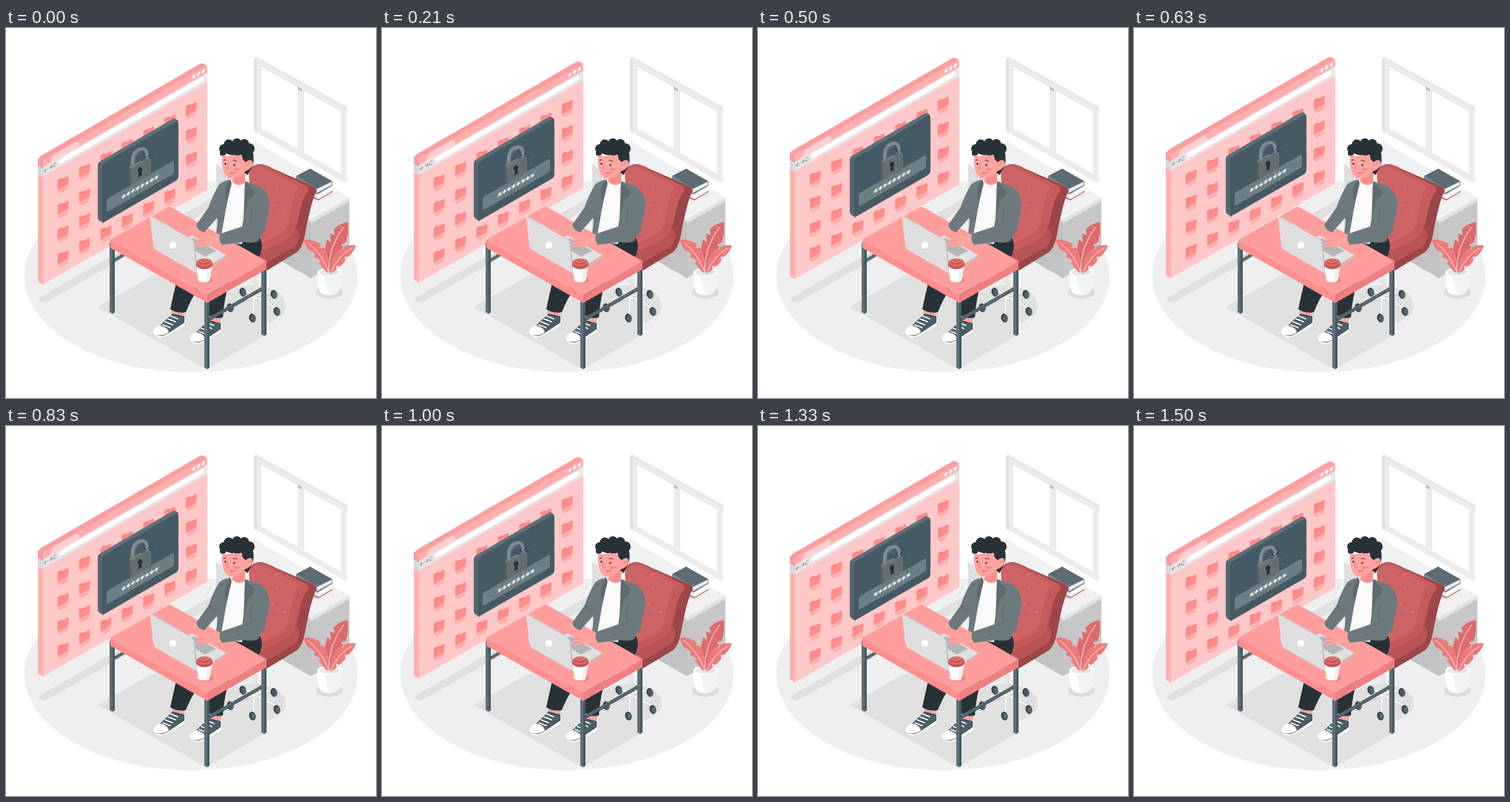
Animation, 500 px wide and 500 px high, one loop 1.54 s. Source, as an HTML page with a canvas:

```html
<!DOCTYPE html>
<html lang="en">
<head>
<meta charset="utf-8">
<title>Locked files</title>
<style>
html, body { margin: 0; width: 100%; height: 100%; overflow: hidden; background: #fff; }
canvas { display: block; width: 100%; height: 100%; }
</style>
</head>
<body>
<canvas id="stage" width="500" height="500"></canvas>
<script>
const ctx = document.getElementById('stage').getContext('2d');
const LOOP = 1540, LIFT = 9, FPS = 24, ISO = 0.577;
const DARK = '#263238', SLATE = '#455a64', SKIN = '#ffa3a0', JACKET = '#6c7a80';

function fill(color, d) {
  ctx.fillStyle = color;
  ctx.fill(new Path2D(d));
}

function line(color, width, d, cap = 'round') {
  ctx.strokeStyle = color;
  ctx.lineWidth = width;
  ctx.lineCap = cap;
  ctx.lineJoin = 'round';
  ctx.stroke(new Path2D(d));
}

function oval(color, x, y, rx, ry = rx, turn = 0) {
  ctx.fillStyle = color;
  ctx.beginPath();
  ctx.ellipse(x, y, rx, ry, turn, 0, 7);
  ctx.fill();
}

function box(color, x, y, w, h, r = 0) {
  ctx.fillStyle = color;
  ctx.beginPath();
  ctx.roundRect(x, y, w, h, r);
  ctx.fill();
}

// Draws in the plane of the floating screen, with its origin at (x, y).
function onScreen(x, y, draw) {
  ctx.save();
  ctx.transform(1, -ISO, 0, 1, x, y);
  draw();
  ctx.restore();
}

function drawRoom() {
  oval('#efefef', 250, 335.3, 225.3, 130);
  fill('#e0e0e0', 'M46 364L276 231Q283 228 289 232L292 236L55 370Q49 372 46 369Q44 366 46 364Z');
  fill('#e0e0e0', 'M124 377L222 321L353 396V414L274 459L263 457Z');
  oval('#e0e0e0', 334, 375, 44, 27);

  fill('#ececec', 'M335 40L338 38L461 106V208L458 209L335 139Z');
  fill('#e2e2e2', 'M335 40L339 42V141L335 139Z');
  fill('#fff', 'M344 51L394 79V163L344 135ZM402 84L453 112V197L402 168Z');
  line('#e0e0e0', 1, 'M344 135V51L394 79M402 168V84L453 112M339 42L460 109');
  fill('#c4c4c4', 'M394 79L400 82V86L394 83Z');

  fill('#dedede', 'M284 184L412 259V338L284 264Z');
  fill('#c7c7c7', 'M412 259L464 229V308L412 338Z');
  fill('#c2c2c2', 'M372 240L412 262V338L372 315Z');
  fill('#f1f1f1', 'M284 183L336 153L464 229L412 259Z');
  fill('#e3e3e3', 'M412 259L464 229V234L412 264Z');
}

function drawBooks() {
  fill('#e8e8e8', 'M408 222L421 213L441 221V225L421 236L414 232Z');
  fill('#fafafa', 'M416 228L441 215V223L422 234Z');
  fill('#c95e60', 'M414 227L422 231L441 220V222L422 233L414 229Z');
  fill('#78868c', 'M392 200L420 217L441 207V213L421 225L414 221V218L392 205Z');
  fill('#f5f5f5', 'M420 218L440 208V212L420 223Z');
  fill('#5c6c74', 'M392 200L411 190L441 207L420 217Z');
  line('#cfd8dc', 0.7, 'M421 221L438 212M423 231L439 222');
}

function drawPlant() {
  oval('#dcdcdc', 437, 357, 18, 9);
  fill('#f3f3f3', 'M421 330C420 350 423 358 430 360Q438 363 446 359C453 355 455 346 454 330Z');
  fill('#fff', 'M421 330C420 350 423 358 430 360Q437 362 442 360C433 357 430 346 431 332Z');
  oval('#fff', 437.5, 330, 16.5, 6);
  oval('#e6e6e6', 437.5, 330.5, 13.5, 4.3);
  fill('#dc6b6d', 'M436 330C430 314 430 296 434 286L439 289L438 278L444 280L443 272Q451 264 462 262C463 274 462 282 459 290L452 293L456 296Q450 304 447 309L442 310Q440 320 438 330Z');
  fill('#ee7b7b', 'M435 331C429 327 427 321 423 318L425 314L416 309L418 305L408 299Q404 293 402 286C411 285 419 288 425 292L424 297L430 297Q437 308 437 329Z');
  fill('#ee7b7b', 'M438 332C439 317 443 304 452 298L455 300L458 295Q466 292 473 294C471 300 467 305 463 309L457 309L459 314Q455 320 450 323L446 321L447 326Q443 330 438 332Z');
  line('#ffe0e0', 1, 'M436 330Q436 295 456 269M436 330Q428 306 408 290M439 330Q448 308 468 297');
}

function drawFolder(x, y) {
  onScreen(x, y, () => {
    fill('#ff8484', 'M-7 -8H-2L0 -6H7V5H-7Z');
    fill('#ff8d8d', 'M-6 -4H8L7 6H-7Z');
    line('#f98787', 0.9, 'M-6 8H7M-4 10.5H6');
  });
}

function drawBrowser() {
  fill('#ffb1b1', 'M43 176L50 179V347L43 343Z');
  fill('#f39a9a', 'M43 177L50 179V190L43 186Z');
  fill('#d9d9d9', 'M43 186L50 190V202L43 198Z');
  fill('#ff9c9c', 'M43 182Q43 175 49 172L260 50Q264 47 267 48.3L272 51.5L50 180V190L43 186Z');
  onScreen(50, 347, () => {
    box('#ffc8c8', 0, -147, 222, 147);
    box('#e7e7e7', 0, -160, 222, 14);
    box('#ffafaf', 0, -168.5, 222, 10, [5, 4, 0, 0]);
    fill('#ffd0d0', 'M6 -158Q10 -158 11 -162Q12 -167 16 -167H43Q47 -167 48 -163Q49 -158 53 -158Z');
    box('#fff', 22, -156.5, 195, 7, 3.5);
    line('#929292', 0.9, 'M1.5 -152.5H6M3.5 -155L1.5 -152.5L3.5 -150.5M8 -152.5H12.5M10.5 -155L12.5 -152.5L10.5 -150.5M18 -154A2.3 2.3 0 1 0 18 -151');
    for (let i = 0; i < 3; i++) oval('#fff', 204 + i * 6.3, -163.5, 2.1, 2.5);
  });
  for (let col = 0; col < 7; col++) {
    for (let row = 0; row < 4; row++) {
      drawFolder(77 + col * 28.85, 210 - col * 16.65 + row * 33.4);
    }
  }
}

function drawLockDialog() {
  fill('#54676f', 'M124 186Q124 182 128 180L224 124Q227 122 229 123L233 126L132 186V264L127 261Q124 259 124 256Z');
  fill('#5f7078', 'M125 182L224 124Q227 122 229 123L232 125L131 185Z');
  onScreen(130, 264, () => {
    box(SLATE, 0, -80, 103, 80, 4);
    box('#6d7e85', 6, -29, 91, 18, 3);
    ctx.fillStyle = '#fff';
    ctx.font = 'bold 12px "DejaVu Sans", sans-serif';
    ctx.fillText('********', 26, -13.5);
  });
  line('#7f8b90', 4.5, 'M171 189V181C171 171 175 166 181 164C188 162 191 166 191 176', 'butt');
  line('#68767b', 1.2, 'M173.5 187V180Q175 170 183 167', 'butt');
  fill('#566166', 'M166 188L169 190V214L166 212Z');
  fill('#747e81', 'M166 188L192 173.5L196 175.5L169 191Z');
  fill('#646f74', 'M169 190L196 175V198L169 213Z');
  oval(DARK, 181, 192, 3, 3.7, 0.3);
  fill(DARK, 'M179.5 193L182.5 192L184 199L179 202Z');
  line('#2d3b42', 1.1, 'M183 179L188 178M187 173L189 176M192 174L195 170M194 176L198 175');
}

function drawScreen(lift) {
  ctx.save();
  ctx.translate(0, -lift);
  drawBrowser();
  drawLockDialog();
  ctx.restore();
}

function drawChair() {
  line('#d2d2d2', 3, 'M335 364L320 355M335 364L362 358M335 364L366 381M335 364L333 389M335 364L303 376');
  line('#fafafa', 2, 'M335 362L320 354M335 362L362 357M335 363L366 379M335 364L334 387M335 363L304 375');
  line('#e4e4e4', 5, 'M337 326V363', 'butt');
  for (const [x, y] of [[320, 357], [362, 360], [366, 383], [333, 392], [303, 378]]) {
    oval('#37474f', x, y, 4.5, 6, -0.3);
    oval('#53666f', x + 1.2, y + 0.5, 2.8, 4.3, -0.3);
  }
  fill('#9d4648', 'M329 191Q335 183 346 184Q354 186 363 191L411 212Q420 215 419 221C412 238 408 258 404 279Q401 297 393 303L357 325Q350 330 346 325L340 302Z');
  fill('#c65b5d', 'M328 194Q331 186 341 184Q349 184 361 191L405 213Q412 217 406 224Q400 231 396 253L390 276Q386 287 377 291L346 309L335 296Z');
  fill('#ce6466', 'M329 195Q333 187 343 188Q351 190 362 196L397 214C386 225 386 249 381 265Q376 280 358 285L338 296Z');
  fill('#b95456', 'M340 306L374 289Q388 282 392 270L396 276Q397 289 390 295L353 317Q347 321 340 316Z');
  line('#f39a9a', 0.8, 'M359 239L361 241M367 247L369 249M375 252L378 251M365 219L367 221');
}

function drawShoe(x, y) {
  ctx.save();
  ctx.translate(x, y);
  fill(DARK, 'M0 18Q0 22 5 23Q16 26 25 18L43 7V-4L27 -8Z');
  fill('#fff', 'M0 17Q3 22 11 22Q18 22 25 16L43 4V8L25 19Q17 25 8 24Q-1 22 0 17Z');
  fill('#4b5e68', 'M10 9L27 -8Q36 -3 42 -5L43 4L25 16Q20 20 15 19Z');
  fill('#fff', 'M1 16Q4 9 11 8Q22 11 22 18Q13 23 5 21Q0 20 1 16Z');
  line('#fff', 1.7, 'M14 7L24 11M17 3L27 7M21 -1L31 3M24 -5L34 -1');
  ctx.restore();
}

function drawHair() {
  oval(DARK, 312, 163, 20, 9.5);
  oval(DARK, 294, 163, 6);
  oval(DARK, 301, 157, 6.5);
  oval(DARK, 312, 155.5, 6.5);
  oval(DARK, 322, 156.5, 6.5);
  oval(DARK, 329, 163, 7);
  oval(DARK, 328, 172, 6.5);
  oval(DARK, 293, 169, 4);
  fill(DARK, 'M319 168L334 172Q336 180 332 188L326 199L322 195V180Q318 177 319 168Z');
}

function drawPerson() {
  fill(SKIN, 'M226 372L242 379L240 391Q232 394 224 386ZM276 380L292 386L290 397Q282 400 276 394Z');
  drawShoe(198, 394);
  drawShoe(247, 403);
  fill(DARK, 'M230 344L260 352Q250 366 243 384Q231 386 222 380Q226 361 230 344ZM270 358L303 342Q295 362 293 391Q281 394 273 387Z');
  fill(DARK, 'M289 278L341 280Q350 293 342 309L328 315L279 292Z');
  fill('#fafafa', 'M301 207L325 209L326 250L319 292Q302 291 287 279Z');
  fill(JACKET, 'M303 205Q291 207 287 213Q280 225 274 243L286 259L284 278L291 280L298 240L304 210Z');
  fill(JACKET, 'M323 207L341 213Q353 219 356 235Q357 250 349 266L341 288Q328 293 316 287L322 250Z');
  fill('#5c6a70', 'M303 205L297 215L294 229L298 231L296 247L305 210ZM323 207L336 221L333 230L328 231L321 259Z');
  fill('#ff8d8a', 'M308 194L323 190L323 209Q316 216 306 208Z');
  drawHair();
  fill(SKIN, 'M292 171C291 184 293 199 301 203Q309 206 319 198L324 192V181Q319 179 318 171Q312 174 308 171Q301 175 292 172Z');
  fill(SKIN, 'M323 183Q328 176 333 180Q335 187 327 192L322 194Z');
  line('#e87573', 0.9, 'M326 186Q328 182 331 182M300 184L298 190L301 191');
  oval(DARK, 296.5, 183.5, 1.1, 1.6);
  oval(DARK, 308.5, 185, 1.1, 1.6);
  line(DARK, 1, 'M294 179L297 178M307 179Q310 178 312 180');
  line('#8b3f40', 0.8, 'M303 196Q307 198 310 195');
  oval('#ff8583', 312, 191, 3.3, 2);
}

function drawLeg(x, top, bottom) {
  fill('#5d6f77', `M${x} ${top}h7V${bottom - 1}l-3 2l-4 -2Z`);
  fill(SLATE, `M${x + 4} ${top}h3V${bottom - 1}l-3 2Z`);
}

function drawDesk() {
  fill('#566870', 'M147 311L164 301V306L147 316Z');
  fill('#566870', 'M274 391L347 349V354L274 396Z');
  line('#3c4d55', 1, 'M274 396L347 354');
  drawLeg(140, 290, 385);
  drawLeg(345, 318, 415);
  drawLeg(268, 364, 460);
  fill('#ff9d9d', 'M141 286L219 242Q221 241 223 242L352 315L272 361Z');
  fill('#ff8f8f', 'M141 286L272 361V371.5L141 297Z');
  fill('#ef7f80', 'M272 361L352 315V326L272 371.5Z');
}

function drawLaptop() {
  fill('#bdbdbd', 'M258 331L298 308V310L259 333Z');
  fill('#e1e1e1', 'M212 303L251 280L298 307L258 331Z');
  fill('#b4b4b4', 'M241 292L254 284L284 301L269 309Z');
  fill('#c8c8c8', 'M195 258Q195 255 199 255L251 285Q254 287 255 290L260 331L257 331L205 301Q201 299 200 296Z');
  fill('#dedede', 'M195 257Q195 254 198 256L249 285Q252 287 253 290L257 331L203 300Q200 298 199 295Z');
  oval('#fff', 225.5, 293.5, 4.8);
}

function drawArms() {
  fill(SKIN, 'M261 264L251 268Q246 274 253 278L258 275L266 273Z');
  fill(JACKET, 'M289 211Q281 222 274 242L257 266Q259 274 268 276L284 258Q295 239 297 219Z');
  line('#58656a', 0.8, 'M275 243Q281 249 286 250');
  fill(SKIN, 'M292 281L277 281L262 279Q255 284 260 288L256 293Q257 298 266 294L278 295L294 291Z');
  line('#ed7875', 0.7, 'M260 288L269 287M259 294L267 291');
  fill(JACKET, 'M342 222Q331 225 330 240L331 264L290 278Q286 286 292 293L332 288Q346 285 350 271L355 243Q355 226 342 222Z');
  line('#5c696e', 0.9, 'M331 264L338 261M332 244L331 264');
}

function drawCup() {
  oval('#e98182', 270, 341, 10, 4);
  fill('#fff', 'M257 320L279 320L275 342Q268 346 260 342Z');
  fill('#efefef', 'M272 323L279 320L275 342L271 344Z');
  fill('#c45658', 'M257 317V322Q268 330 279 322V317Z');
  oval('#d96a6b', 268, 317, 11, 5);
  fill('#c45658', 'M260 314V317Q268 322 276 317V314Z');
  oval('#d96a6b', 268, 314.5, 8, 3.3);
}

function render() {
  const now = performance.now() % LOOP;
  const t = Math.floor((now + 5) * FPS / 1000) * 1000 / FPS;
  const lift = LIFT * (1 - Math.cos((t + 80) / LOOP * Math.PI * 2)) / 2;
  ctx.fillStyle = '#fff';
  ctx.fillRect(0, 0, 500, 500);
  drawRoom();
  drawBooks();
  drawScreen(lift);
  drawChair();
  drawPlant();
  drawPerson();
  drawDesk();
  drawLaptop();
  drawArms();
  drawCup();
  requestAnimationFrame(render);
}

render();
</script>
</body>
</html>
```
